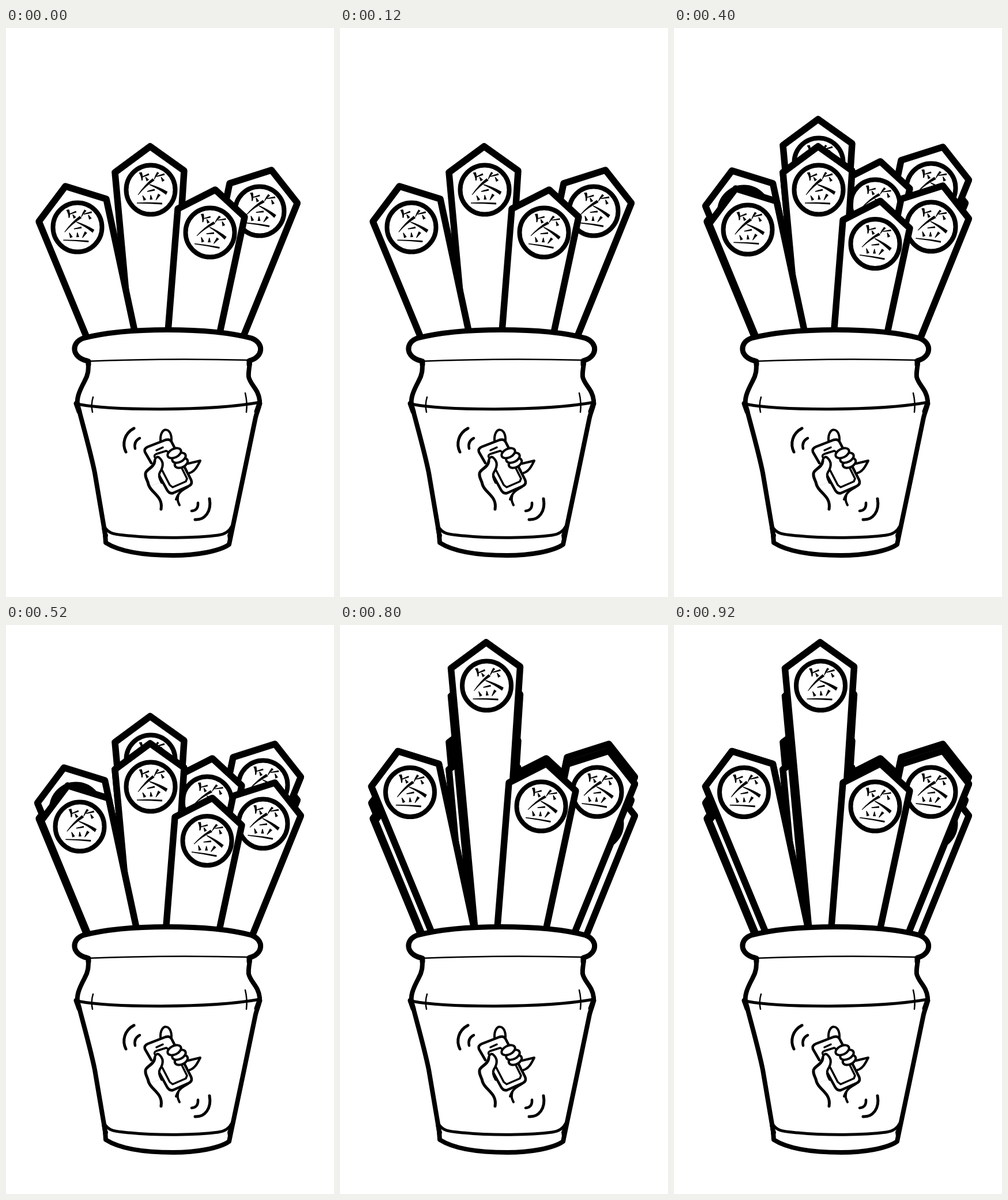
An HTML page with a canvas for the animation above (1000 ms loop, 569 px wide and 985 px high).

```html
<!DOCTYPE html>
<html lang="zh">
<head>
<meta charset="utf-8">
<style>
html, body { margin: 0; width: 100%; height: 100%; overflow: hidden; background: #fff; }
canvas { display: block; }
</style>
</head>
<body>
<canvas id="stage" width="569" height="985" role="img" aria-label="签"></canvas>
<script>
const ctx = document.getElementById('stage').getContext('2d');
const STEP = 200, BOTTOM = 550;

// Listed back to front; slopes are dx/dy of the long edges.
const sticks = [
  { left: [388, 269], tip: [460.5, 246], right: [505.5, 303], slopes: [-.21, -.406], seal: [440, 317], tilt: .12 },
  { left: [189, 250], tip: [250, 205], right: [309, 247], slopes: [.092, -.065], seal: [251, 280], tilt: 0 },
  { left: [298, 313], tip: [363, 280], right: [414, 327], slopes: [-.08, -.215], seal: [354, 354], tilt: .14 },
  { left: [57, 335], tip: [103, 274], right: [174, 296], slopes: [.414, .215], seal: [124, 345], tilt: .03 }
];

// Offset of every stick in each shake; earlier shakes stay visible underneath.
const shakes = [
  [[0, 0], [0, 0], [0, 0], [0, 0]],
  [[6, -40], [0, -47], [-5, -49], [-2.5, -27]],
  [[6, 27], [0, 0], [-5, 19.5], [4, 4]],
  [[6, -28], [3.5, -127], [-5, -40], [-2.5, -55.5]],
  [[6, -28], [3.5, -175], [-5, -40], [-2.5, -55.5]]
];

// Brush strokes: x1, y1, x2, y2, start width, end width, bend
const glyph = [
  [-18, -30, -15, -16, 5, 2, -2],
  [-15, -22, -3, -27, 1.5, 3, 0],
  [-9, -22, -5, -16, 1, 5, 0],
  [13, -30, 6, -18, 4, 1, 1],
  [10, -23, 24, -27, 1.5, 3, 0],
  [18, -22, 22, -15, 1, 5, 0],
  [5, -18, -22, 9, 5, 1, 3],
  [-2, -9, 28, 6, 1.5, 6, -2],
  [-6, 3, 7, 0, 1.5, 3, 0],
  [-14, 10, -10, 18, 1, 5, 0],
  [0, 9, 1, 17, 1, 5, 0],
  [15, 8, 9, 18, 5, 1, 0],
  [-24, 23, 20, 24, 1.5, 3, -1]
];

function brush([x1, y1, x2, y2, w1, w2, bend]) {
  const len = Math.hypot(x2 - x1, y2 - y1);
  const nx = (y1 - y2) / len, ny = (x2 - x1) / len;
  const mx = (x1 + x2) / 2, my = (y1 + y2) / 2;
  const mid = (w1 + w2) / 4;
  ctx.beginPath();
  ctx.moveTo(x1 + nx * w1 / 2, y1 + ny * w1 / 2);
  ctx.quadraticCurveTo(mx + nx * (bend + mid), my + ny * (bend + mid), x2 + nx * w2 / 2, y2 + ny * w2 / 2);
  ctx.lineTo(x2 - nx * w2 / 2, y2 - ny * w2 / 2);
  ctx.quadraticCurveTo(mx + nx * (bend - mid), my + ny * (bend - mid), x1 - nx * w1 / 2, y1 - ny * w1 / 2);
  ctx.closePath();
  ctx.fill();
}

function drawStick({ left, tip, right, slopes, seal, tilt }, [dx, dy]) {
  const foot = ([x, y], slope) => [x + (BOTTOM - dy - y) * slope, BOTTOM - dy];
  ctx.save();
  ctx.translate(dx, dy);
  ctx.beginPath();
  for (const p of [foot(left, slopes[0]), left, tip, right, foot(right, slopes[1])]) ctx.lineTo(...p);
  ctx.fillStyle = '#fff';
  ctx.fill();
  ctx.lineWidth = 11.5;
  ctx.stroke();
  ctx.translate(...seal);
  ctx.beginPath();
  ctx.arc(0, 0, 42.5, 0, Math.PI * 2);
  ctx.lineWidth = 8;
  ctx.stroke();
  ctx.rotate(tilt);
  ctx.fillStyle = '#000';
  glyph.forEach(brush);
  ctx.restore();
}

function line(d, width, fill) {
  const path = new Path2D(d);
  if (fill) {
    ctx.fillStyle = fill;
    ctx.fill(path);
  }
  ctx.lineWidth = width;
  ctx.stroke(path);
}

function finger(x, y, rx, ry) {
  ctx.beginPath();
  ctx.ellipse(x, y, rx, ry, -.45, 0, Math.PI * 2);
  ctx.fillStyle = '#fff';
  ctx.fill();
  ctx.lineWidth = 4;
  ctx.stroke();
}

function drawPot() {
  // body
  line('M143 578C143 592 143 600 136 612C127 629 121 643 125 655C134 690 147 735 154 770L172 876L173 891' +
    'C198 907 240 913 290 913C330 913 370 906 387 894L392 870L412 775L433 674C436 662 441 654 440 645' +
    'C438 625 424 618 421 604C420 594 423 586 423 578', 8, '#fff');
  line('M124 651C180 662 350 664 440 648', 5);
  line('M151 639Q147 652 150 665M415 632Q419 648 417 665', 2.5);
  line('M170 862C178 877 190 877 215 879C265 884 330 883 368 878Q385 876 392 862', 5);
  line('M168 864L172 890L175 878ZM392 864L388 892L386 878Z', 4, '#000');
  // rim
  line('M140 576C114 570 112 545 134 537C180 525 230 522.5 280 522.5C330 522.5 385 526 426 537' +
    'C449 546 446 570 422 576', 9, '#fff');
  line('M138 577Q280 571 424 575', 2.5);
  line('M122 650L127 664M440 650L435 664M143 577L143 583M422 577L422 583', 9);
}

function drawHand() {
  line('M222 693C205 702 201 720 208 734M353 815C357 837 345 852 328 851', 5);
  line('M232 710Q221 716 224 728M333 822Q334 835 322 836', 4.5);
  line('M268 714C267 689 288 690 287 714', 4);
  // phone
  line('M252 753L241 734Q239 728 246 725L277 713Q284 711 287 716L321 782Q324 790 317 793' +
    'L290 805Q283 807 279 799L262 768', 4.5, '#fff');
  line('M258 743Q256 739 262 737L278 732L285 736M305 762L314 780L312 785L289 795L284 791L270 764', 3.5);
  line('M261 731L272 726', 3.5);
  // fingers
  line('M316 754L337 749C332 759 327 769 316 771', 4, '#fff');
  finger(304, 753, 12, 7.5);
  finger(300, 744, 12.5, 7.5);
  finger(292, 736, 12.5, 7.5);
  // thumb and wrist
  line('M263 741C275 748 274 760 268 769C264 775 266 779 270 786L252 792L244 774Q257 762 258 751Z', 0.1, '#fff');
  line('M258 750C258 745 262 740 266 744C276 753 271 763 267 769C264 774 266 780 270 787', 4);
  line('M258 750C257 761 243 764 242 771C241 779 246 783 247 790C251 805 273 810 269 833', 5);
  line('M316 794C307 800 300 802 295 816M299 808C296 818 299 821 301 826', 4);
}

function draw(shake) {
  ctx.fillStyle = '#fff';
  ctx.fillRect(0, 0, 569, 985);
  ctx.strokeStyle = '#000';
  ctx.lineCap = ctx.lineJoin = 'round';
  for (const offsets of shakes.slice(0, shake + 1)) sticks.forEach((s, i) => drawStick(s, offsets[i]));
  drawPot();
  drawHand();
}

let shown = -1;
function tick() {
  const shake = Math.floor(performance.now() / STEP) % shakes.length;
  if (shake !== shown) draw(shown = shake);
  requestAnimationFrame(tick);
}
tick();
</script>
</body>
</html>
```
